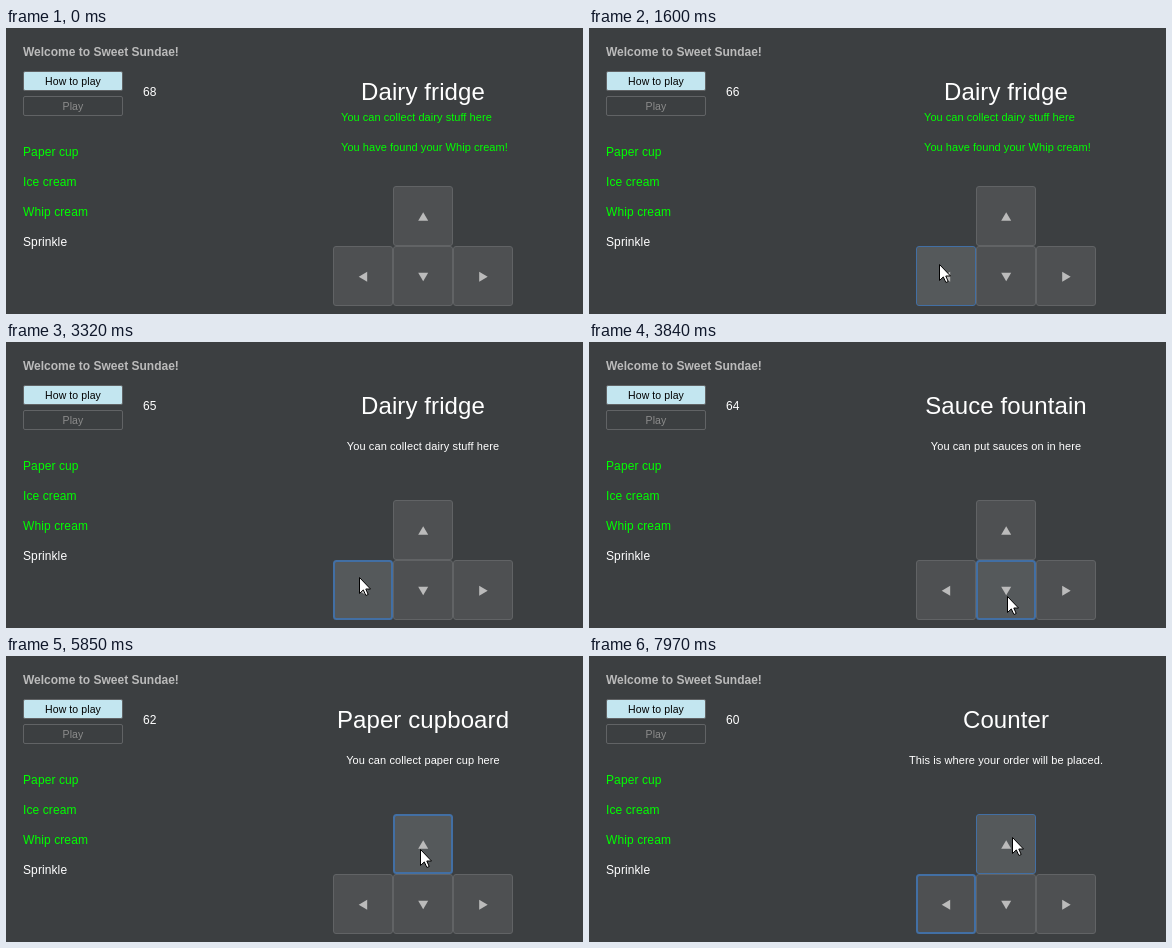
Recreate the animation shown at these times as an HTML page. Size 577x286 px, loop 8 s.

```html
<!DOCTYPE html>
<html lang="en">
<head>
<meta charset="utf-8">
<title>Sweet Sundae</title>
<style>
html, body { margin: 0; width: 100%; height: 100%; overflow: hidden; background: #3c3f41; }
body { position: relative; font: 12px/14px "Liberation Sans", Arial, sans-serif; letter-spacing: .1px; color: #fff; }
div, svg, ul { position: absolute; white-space: pre; }
svg { left: 0; top: 0; }
h1 { position: absolute; left: 17px; top: 17px; margin: 0; font: inherit; font-weight: bold; letter-spacing: 0; color: #bbb; }
ul { left: 17px; top: 109px; margin: 0; padding: 0; line-height: 30px; list-style: none; }
.mid { left: 217px; width: 400px; text-align: center; }
.got { color: #0f0; }
.btn { left: 17px; width: 98px; height: 18px; font-size: 10.5px; line-height: 19px; text-align: center;
  border: 1px solid #616365; border-radius: 2px; }
#count { left: 137px; top: 57px; }
#title { top: 50px; font-size: 24px; line-height: 27px; }
#sub { top: 98px; font-size: 11px; line-height: 12px; }
#found { left: 335px; top: 74px; font-size: 11px; line-height: 30px; letter-spacing: .05px; }
</style>
</head>
<body>
<h1>Welcome to Sweet Sundae!</h1>
<div class="btn" style="top:43px;background:#c3e6f0;color:#000">How to play</div>
<div class="btn" style="top:68px;color:#8c8c8c">Play</div>
<div id="count"></div>
<ul><li class="got">Paper cup</li><li class="got">Ice cream</li><li class="got">Whip cream</li><li>Sprinkle</li></ul>
<div id="title" class="mid"></div>
<div id="sub" class="mid"></div>
<div id="found" class="got">You can collect dairy stuff here
You have found your Whip cream!</div>
<svg id="pad" width="577" height="286">
  <path id="cursor" d="M.5.5V16.5L4.3 12.9 6.9 18.5 9.2 17.5 6.8 12H11.5Z" fill="#fff" stroke="#000"/>
</svg>
<script>
const LOOP = 8000, SIZE = 60, STEP = 100;
const $ = id => document.getElementById(id);

const rooms = {
  dairy: { title: 'Dairy fridge', sub: 'You can collect dairy stuff here', down: 'sauce' },
  sauce: { title: 'Sauce fountain', sub: 'You can put sauces on in here', left: 'paper' },
  paper: { title: 'Paper cupboard', sub: 'You can collect paper cup here', left: 'counter' },
  counter: { title: 'Counter', sub: 'This is where your order will be placed.' }
};
const presses = [[1900, 'left'], [3840, 'down'], [4440, 'left'], [5850, 'up'], [7250, 'left']];

// Pointer moves: start, end, destination
const home = [503, 289];
const moves = [
  [100, 600, 339, 227], [700, 1200, 350, 236], [2010, 2410, 401, 203],
  [2510, 2900, 411, 198], [3020, 3320, 353, 235], [3420, 3840, 418, 254],
  [3840, 4240, 352, 244], [4540, 5140, 414, 193], [6550, 7050, 361, 245], [7350, 7970, 423, 181]
];

function add(tag, attrs) {
  const el = document.createElementNS('http://www.w3.org/2000/svg', tag);
  $('pad').insertBefore(el, $('cursor'));
  return set(el, attrs);
}
function set(el, attrs) {
  for (const k in attrs) el.setAttribute(k, attrs[k]);
  return el;
}

function key(name, col, row, turn) {
  const x = 387 + col * SIZE, y = 218 + row * SIZE;
  const face = add('rect', { rx: 2.5 });
  add('path', { d: 'M0-4.5 5 4H-5Z', fill: '#bbb', transform: `translate(${x + 30.2} ${y + 30.7}) rotate(${turn})` });
  return { name, x, y, face };
}
const keys = [key('up', 0, -1, 0), key('left', -1, 0, -90), key('down', 0, 0, 180), key('right', 1, 0, 90)];

// The screen refreshes ten times a second while the pointer moves
function pointer(t) {
  let [x, y] = home;
  for (const [from, to, toX, toY] of moves) {
    if (t < from) break;
    const k = t >= to ? 1 : Math.floor((t - from) / STEP) * STEP / (to - from);
    const ease = k * k * (3 - 2 * k);
    x += (toX - x) * ease;
    y += (toY - y) * ease;
  }
  return [Math.round(x), Math.round(y)];
}

function draw(t) {
  const done = presses.filter(([at]) => at <= t);
  const room = rooms[done.reduce((r, [, dir]) => rooms[r][dir] || r, 'dairy')];
  const focus = done.length ? done.at(-1)[1] : '';
  $('title').textContent = room.title;
  $('sub').textContent = focus ? room.sub : '';
  $('found').style.display = focus ? 'none' : '';
  $('count').textContent = 68 - Math.floor((t + 410) / 1005);

  const [px, py] = pointer(t);
  for (const { name, x, y, face } of keys) {
    const hover = px >= x && px < x + SIZE && py >= y && py < y + SIZE;
    const w = name === focus ? 2 : 1;
    set(face, {
      x: x + w / 2, y: y + w / 2, width: SIZE - w, height: SIZE - w, 'stroke-width': w,
      fill: hover ? '#55595b' : '#4e5052',
      stroke: hover || name === focus ? '#426fa4' : '#616365'
    });
  }
  set($('cursor'), { transform: `translate(${px} ${py})` });
}

const start = performance.now();
function frame() {
  draw((performance.now() - start) % LOOP);
  requestAnimationFrame(frame);
}
frame();
</script>
</body>
</html>
```
